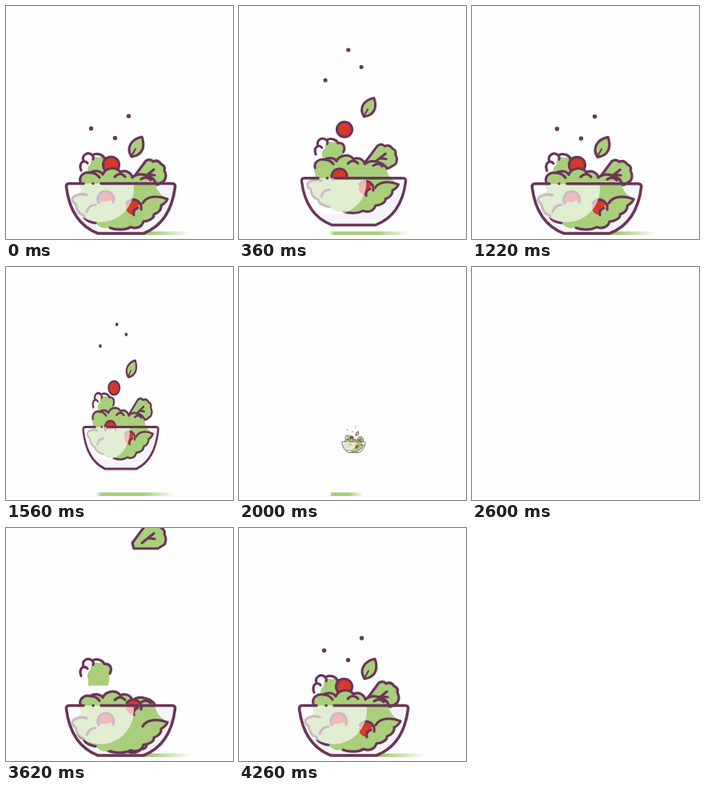
An HTML page that plays this animation: 284x292 px, repeating every 4420 ms.

```html
<!DOCTYPE html>
<html lang="en">
<head>
<meta charset="utf-8">
<title>Salad toss</title>
<style>
  html, body { margin: 0; width: 100%; height: 100%; overflow: hidden; background: #fefefe; }
  svg { display: block; width: 100vw; height: 100vh; }
  .line { fill: none; stroke: #6a3658; stroke-width: 3.2; stroke-linecap: round; stroke-linejoin: round; }
  .green { fill: #a9cf7a; }
  .red { fill: #d7392b; }
  .white { fill: #fff; }
  .dot { fill: #6a3658; }
  #bits .line { vector-effect: non-scaling-stroke; stroke-width: 2.8; }
</style>
</head>
<body>
<svg viewBox="0 0 284 292">
  <defs>
    <linearGradient id="fade">
      <stop offset="0" stop-color="#a9cf7a" stop-opacity="0"/>
      <stop offset=".07" stop-color="#a9cf7a"/>
      <stop offset=".6" stop-color="#a9cf7a"/>
      <stop offset="1" stop-color="#a9cf7a" stop-opacity="0"/>
    </linearGradient>
    <path id="glass" d="M79 222.5H208q4 0 3.5 4.5C208 255 195 276 172 285H115C92 276 79 255 75.5 227q-.5-4.5 3.5-4.5Z"/>
    <clipPath id="inGlass"><use href="#glass"/></clipPath>
    <clipPath id="inside">
      <rect x="-100" y="-400" width="500" height="623"/>
      <use href="#glass"/>
    </clipPath>
    <g id="cloud">
      <path class="line white" style="fill:#fff" d="M-10-3C-13-10-5-13-1-9C4-14 12-10 10-4C15 0 12 9 5 9C0 13-9 11-9 5C-14 5-14-2-10-3Z"/>
      <path class="green" d="M-7 3C-6-1-2-2 0-2C3-6 7-5 8-3C12 0 10 7 4 7C0 11-7 9-7 3Z"/>
    </g>
    <g id="blob">
      <path class="line" style="fill:#a9cf7a" d="M-10-3C-13-10-5-13-1-9C4-14 12-10 10-4C15 0 12 9 5 9C0 13-9 11-9 5C-14 5-14-2-10-3Z"/>
      <path class="white" d="M-9-4C-11-9-5-11-1-8C3-11 7-9 7-7C1-8-3-6-4-3C-6-2-8-2-9-4Z"/>
    </g>
    <g id="square">
      <path class="green" d="M-7-9L9-6L6 5Q1 4 0 7L-8 3Z"/>
      <path class="line" style="stroke-width:2" d="M-8 5L-10 1L-6-9Q2-9 9-5L7 4M-8 9q3 4 5 0q3 0 4-3"/>
    </g>
    <g id="bigLeaf">
      <path class="line" style="fill:#a9cf7a" d="M-15-18Q-10-22 0-21Q8-19 12-10Q16-4 20-2Q21 4 16 6Q17 15 9 15Q3 21-6 19Q-10 14-14 8Q-20 1-19-8Q-18-15-15-18Z"/>
      <path class="line" d="M-15-18L-18-22M-8-9L4 6"/>
    </g>
    <g id="crescent">
      <path class="green" d="M-2-12Q7 0-2 13Z"/>
      <path class="line" d="M-2-12Q7 0-2 13"/>
    </g>
    <path id="arc" class="line" d="M-17 1Q-2 10 14-1"/>
    <path id="hook" class="line" d="M-2-5Q4-2 2 6"/>
    <ellipse id="speck" class="dot" rx="2.4" ry="1.6" style="fill:#7d8a50"/>
  </defs>

  <rect id="shadow" x="112" y="282.5" width="120" height="4.5" fill="url(#fade)"/>

  <g id="bowl">
    <use href="#glass" fill="#f5f4f8"/>
    <circle cx="118" cy="229" r="42" fill="#fff" clip-path="url(#inGlass)"/>
    <g clip-path="url(#inside)">
      <g id="bits"></g>
      <g id="head">
        <path class="white" d="M94 206C90 199 95 195 97 194C94 186 103 182 108 187C114 183 122 187 123 191C131 190 133 197 130 203L128 215H98Z"/>
        <path class="green" d="M103 210C100 204 104 199 106 198C105 191 112 187 116 190C121 187 125 190 124 193C131 192 132 198 130 203L128 218H103Z"/>
        <path class="line" d="M94 206C91 199 95 195 97 195C94 186 103 182 108 187C114 183 122 187 123 191C131 190 133 197 130 203M97 195Q100 194 102 197M108 187Q110 189 109 192"/>
      </g>
      <g id="romaine">
        <path class="line" style="fill:#a9cf7a" d="M158 217L175 194Q181 191 184 195Q190 192 194 198Q200 201 198 206Q202 213 198 219L190 224H160Z"/>
        <path class="line" d="M170 217L185 205M178 211L186 212"/>
      </g>
      <g id="topTomato"><circle class="line" style="fill:#d7392b" cx="131.500" cy="199" r="10"/></g>
      <g id="mass">
        <path class="green" d="M92 224C90 213 98 207 105 209C112 205 119 207 121 211C125 202 138 201 143 208C150 205 157 209 158 215C166 207 183 212 187 224C189 232 194 237 201 241C201 246 198 248 194 250C195 255 190 260 185 261C186 266 178 270 172 270C170 277 163 280 156 277C149 281 138 281 130 277C124 280 117 278 112 272C106 271 99 269 97 262C90 261 88 252 86 247C82 244 82 240 86 238C93 235 95 231 92 224Z"/>
        <path class="line" d="M93 220C91 213 98 207 105 209C112 205 119 207 121 211C125 202 138 201 143 208C150 205 157 209 158 215C166 207 183 212 187 221M105 209Q113 209 117 215M136 214Q143 207 149 214M169 217Q176 212 181 218"/>
        <path class="line" d="M101 237C93 234 82 238 83 243Q84 247 87 248C88 254 91 261 97 262C98 269 106 271 112 272M130 278C138 281 149 281 156 277C163 280 170 277 172 270C178 270 186 266 185 261C190 260 195 255 194 250Q200 247 202 242C190 237 176 238 171 247M101 258Q104 249 112 249"/>
      </g>
      <g id="leftTomato">
        <circle class="red" cx="125" cy="242" r="10"/>
        <path class="green" d="M114 251Q118 243 125 246Q132 241 137 248L134 256H116Z"/>
        <path class="line" d="M116 247A10 10 0 1 1 134 246"/>
      </g>
      <g id="rightTomato">
        <circle class="red" cx="160" cy="252" r="10"/>
        <path class="green" d="M160 264Q158 256 165 253Q165 247 171 249V264Z"/>
        <path class="line" d="M151 247A10 10 0 0 1 169 255M160 262Q158 256 165 253"/>
      </g>
    </g>
    <circle cx="118" cy="229" r="42" fill="#fff" opacity=".66" clip-path="url(#inGlass)"/>
    <path class="line" style="stroke-width:3.6" d="M119 222.500H208q4 0 3.500 4.500C208 255 195 276 172 285H115C92 276 79 255 75.500 227q-.5-4.500 3.500-4.500H97M109 222.500h.1"/>
    <g id="leaf">
      <path class="line" style="fill:#a9cf7a" d="M170 164C174 175 172 187 157 189C150 178 156 167 170 164Z"/>
      <path class="line" style="stroke-width:2" d="M157 188L162 179"/>
    </g>
    <circle id="dotA" class="dot" cx="153.500" cy="138" r="2.700"/>
    <circle id="dotB" class="dot" cx="106.500" cy="153.500" r="2.700"/>
    <circle id="dotC" class="dot" cx="136.500" cy="165.500" r="2.700"/>
  </g>
</svg>
<script>
const LOOP = 4420, MID = 143.5, BASE = 285, PERIOD = 600, POUR = 3240;
const $ = id => document.getElementById(id);
const clamp = v => Math.max(0, Math.min(1, v));

// Eased value list at time t from rows of [time, ...values]
function at(rows, t) {
  let i = 1;
  while (i < rows.length - 1 && t > rows[i][0]) i++;
  const [a, b] = [rows[i - 1], rows[i]];
  const u = clamp((t - a[0]) / (b[0] - a[0])), e = u * u * (3 - 2 * u);
  return a.slice(1).map((v, k) => v + (b[k + 1] - v) * e);
}

// Rows: time, x scale, y scale, lift
const hop = [[0, 1, 1, 0], [210, 1.12, .9, 0], [360, .957, .94, 10.5],
  [460, 1, 1, 0], [530, 1.05, .96, 0], [600, 1, 1, 0]];
const leave = [[1200, 1, 1, 0], [1390, 1.12, .9, 0], [1460, 1, 1.02, 8], [1560, .69, .84, 32],
  [1620, .66, .72, 34], [2050, .2, .2, 53], [2590, 0, 0, 59]];
const enter = [[2600, 0, 0, 150], [2700, .8, 1, 0], [2760, 1.14, .86, 0],
  [2840, .96, 1.04, 0], [2920, 1, 1, 0]];

const toss = [[0, 0], [220, 0], [370, 1.02], [560, 0]];
const lastToss = [[1200, 0], [1400, 0], [1520, 1], [1560, .85], [1700, 0]];
const shade = [[1200, 1], [1390, 1], [1560, .83], [2100, .3], [2590, 0],
  [2600, 0], [2700, .85], [2800, 1]];
const hopShade = [[0, 1], [210, 1], [360, .85], [480, 1]];

// Parts: toss height, landing time
const parts = {
  head: [15, 3650], romaine: [15, 3900], topTomato: [41, 3980],
  leftTomato: [22, 3620], rightTomato: [16, 3660], leaf: [48, 4140],
  dotA: [63, 4200], dotB: [61, 4230], dotC: [113, 4250]
};

// Poured pieces: shape, x, y, scale
const bits = [
  ['cloud', 86, 47, 1], ['speck', 163, 28, 1], ['arc', 186, 81, 1],
  ['cloud', 191, 70, 1], ['cloud', 165, 80, .55], ['cloud', 154, 91, .55],
  ['square', 117, 109, 1], ['bigLeaf', 180, 132, 1], ['crescent', 95, 183, 1],
  ['hook', 142, 183, 1], ['blob', 129, 198, 1.6], ['cloud', 113, 258, .9],
  ['blob', 141, 260, 1.5], ['cloud', 170, 256, .55]
].map(([shape, x, y, s]) => {
  const el = document.createElementNS('http://www.w3.org/2000/svg', 'use');
  el.setAttribute('href', '#' + shape);
  $('bits').append(el);
  return { el, x, y, s };
});

const move = (id, value) => $(id).setAttribute('transform', value);
const show = (el, on) => el.setAttribute('visibility', on ? 'visible' : 'hidden');

function draw(t) {
  const tossing = t < 1200, filling = t >= 2600, phase = t % PERIOD;
  const [sx, sy, lift] = tossing ? at(hop, phase) : at(filling ? enter : leave, t);
  move('bowl', `translate(${MID} ${BASE - lift}) scale(${sx} ${sy}) translate(${-MID} ${-BASE})`);

  const [w] = tossing ? at(hopShade, phase) : at(shade, t);
  move('shadow', `translate(114 0) scale(${w} 1) translate(-114 0)`);

  const [h] = tossing ? at(toss, phase) : filling ? [0] : at(lastToss, t);
  for (const [id, [rise, land]] of Object.entries(parts)) {
    const left = filling ? 1 - clamp((t - land + 380) / 380) : 0;
    move(id, `translate(0 ${-rise * h - 270 * left})`);
    show($(id), left < 1);
  }
  const sink = filling ? 85 * (1 - at([[3290, 0], [3650, 1]], t)[0]) : 0;
  move('mass', `translate(0 ${sink - 11 * h})`);
  show($('mass'), sink < 85);

  const dt = t - POUR;
  for (const { el, x, y, s } of bits) {
    const px = x + (MID - x) * Math.max(0, dt) / 700;
    const py = Math.min(y + .55 * dt, 262);
    el.setAttribute('transform', `translate(${px} ${py}) scale(${s})`);
    show(el, t > 2720 && t < 3700);
  }
}

const start = performance.now();
function tick() {
  draw(Math.min((performance.now() - start) % LOOP, 4260) % 4260);
  requestAnimationFrame(tick);
}
draw(0);
requestAnimationFrame(tick);
</script>
</body>
</html>
```
